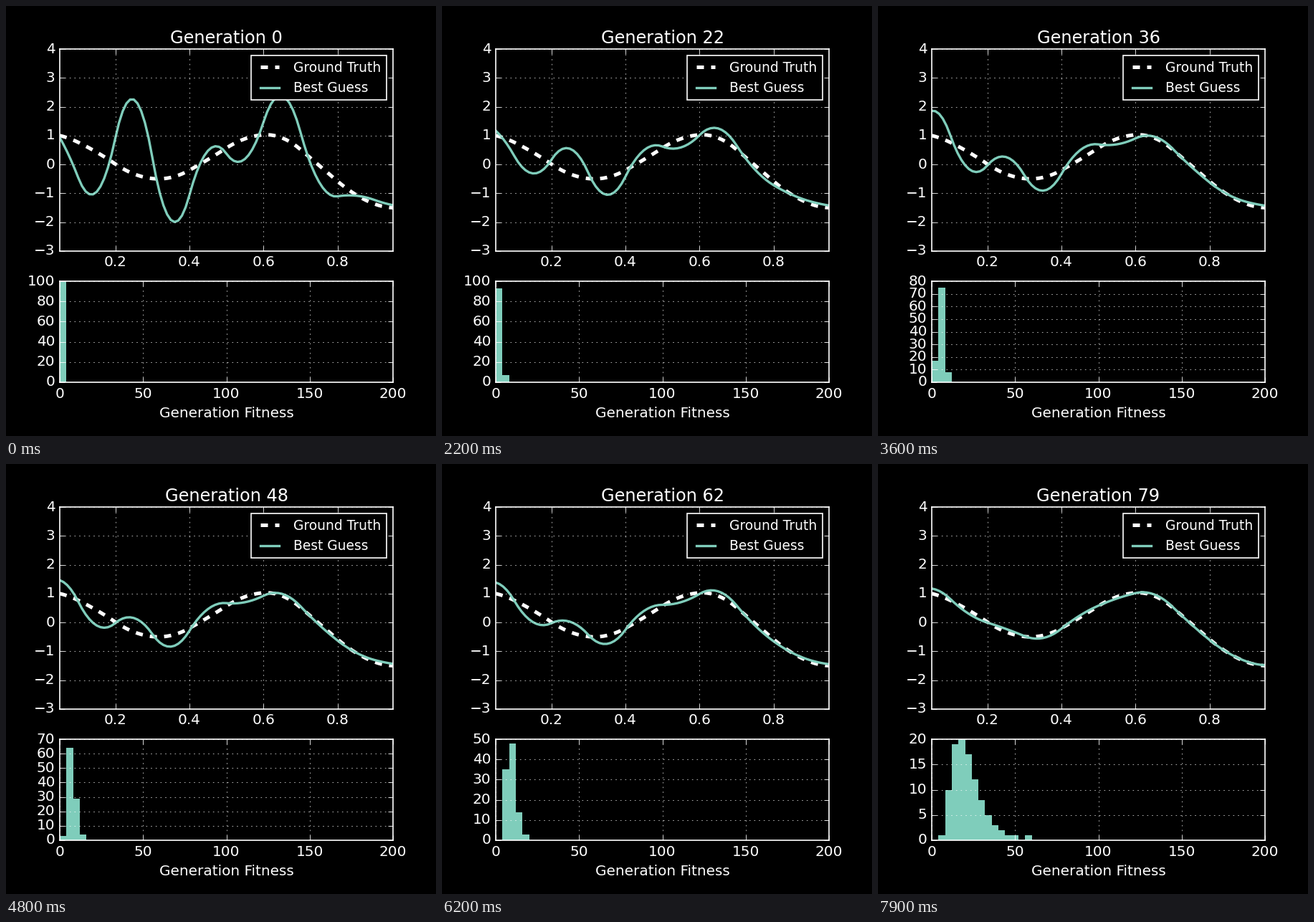
A matplotlib script that plays this animation: 600x600 px, repeating every 8000 ms.

```python
import numpy as np
import matplotlib.pyplot as plt
from matplotlib.animation import FuncAnimation

plt.style.use(["classic", "dark_background"])
plt.rcParams.update({"font.family": "DejaVu Sans", "font.size": 12,
                     "savefig.dpi": "figure", "grid.alpha": 0.8})

TEAL = "#7fcdbb"
GENERATIONS = 80
POPULATION = 100
edges = np.arange(0, 201, 4)
x = np.linspace(0.05, 0.95, 91)

# Spline control points, 0.1 apart, with one beyond each end of the axis
truth = np.array([1.07, 1.08, 0.45, -0.42, -0.56, 0.155,
                  0.98, 1.07, -0.03, -1.13, -1.61, -1.21])
k = np.arange(len(truth))
zigzag = -(-1.0) ** k

# Evenly ranked normal deviates, one per individual
ranks = (np.arange(POPULATION) + 0.5) / POPULATION
deviates = np.quantile(np.random.default_rng(1).normal(size=200000), ranks)


def spline(c):
    """Quadratic B-spline with its knots on multiples of 0.1."""
    i = np.clip(np.floor(x * 10 + 1e-9).astype(int), 0, 9)
    t = x * 10 - i
    return (0.5 * (1 - t) ** 2 * c[i] + (0.5 + t - t * t) * c[i + 1]
            + 0.5 * t * t * c[i + 2])


def swing(gen, centre, width, size, decay, period=np.inf):
    """A local error that dies out, changing sign if it has a period."""
    bump = np.exp(-0.5 * ((k - centre) / width) ** 2)
    return size * bump * np.exp(-gen / decay) * np.cos(2 * np.pi * gen / period)


def best_guess(gen):
    error = (1.45 - 0.16 * k
             + swing(gen, 0, 0.85, -2.8, 60, 22)
             + swing(gen, 3.1, 0.9, 3.4, 13)
             + swing(gen, 7, 0.84, 2.06, 40, 28))
    fade = 1 - (gen / 84) ** 4
    return spline(truth + zigzag * error * fade)


def fitness_counts(gen):
    median = np.interp(gen, [0, 18, 36, 62, 79], [1, 1.8, 5.3, 9, 20])
    spread = np.interp(gen, [62, 79], [0.3, 0.42])
    return np.histogram(median * np.exp(spread * deviates), edges)[0]


def scale_counts(peak):
    step = next(s for s in (1, 2, 5, 10, 20) if np.ceil(peak / s) <= 9)
    top = np.ceil(peak / step) * step
    hist.set_yticks(np.arange(0, top + 1, step))
    hist.set_ylim(0, top)


fig, (ax, hist) = plt.subplots(
    2, 1, figsize=(5, 5), dpi=120,
    gridspec_kw=dict(height_ratios=[2, 1], left=0.125, right=0.9,
                     bottom=0.125, top=0.9, hspace=0.2))

ax.plot(x, spline(truth), "--", color="white", lw=3, label="Ground Truth")
best, = ax.plot(x, best_guess(0), color=TEAL, lw=2, label="Best Guess")
ax.set_xticks([0.2, 0.4, 0.6, 0.8])
ax.set_yticks(range(-3, 5))
ax.set_xlim(0.05, 0.95)
ax.set_ylim(-3, 4)
ax.grid(True)
ax.legend(loc="upper right", fontsize=11.15, numpoints=2)
title = ax.set_title("Generation 0")

bars = hist.bar(edges[:-1], fitness_counts(0), np.diff(edges),
                align="edge", color=TEAL, linewidth=0)
hist.set_xticks(range(0, 201, 50))
hist.set_xlim(0, 200)
hist.grid(True)
hist.set_xlabel("Generation Fitness")


def draw(gen):
    title.set_text(f"Generation {gen}")
    best.set_ydata(best_guess(gen))
    counts = fitness_counts(gen)
    for bar, height in zip(bars, counts):
        bar.set_height(height)
    scale_counts(counts.max())
    return title, best, *bars


anim = FuncAnimation(fig, draw, frames=GENERATIONS, interval=100, repeat=True)
plt.show()
```
